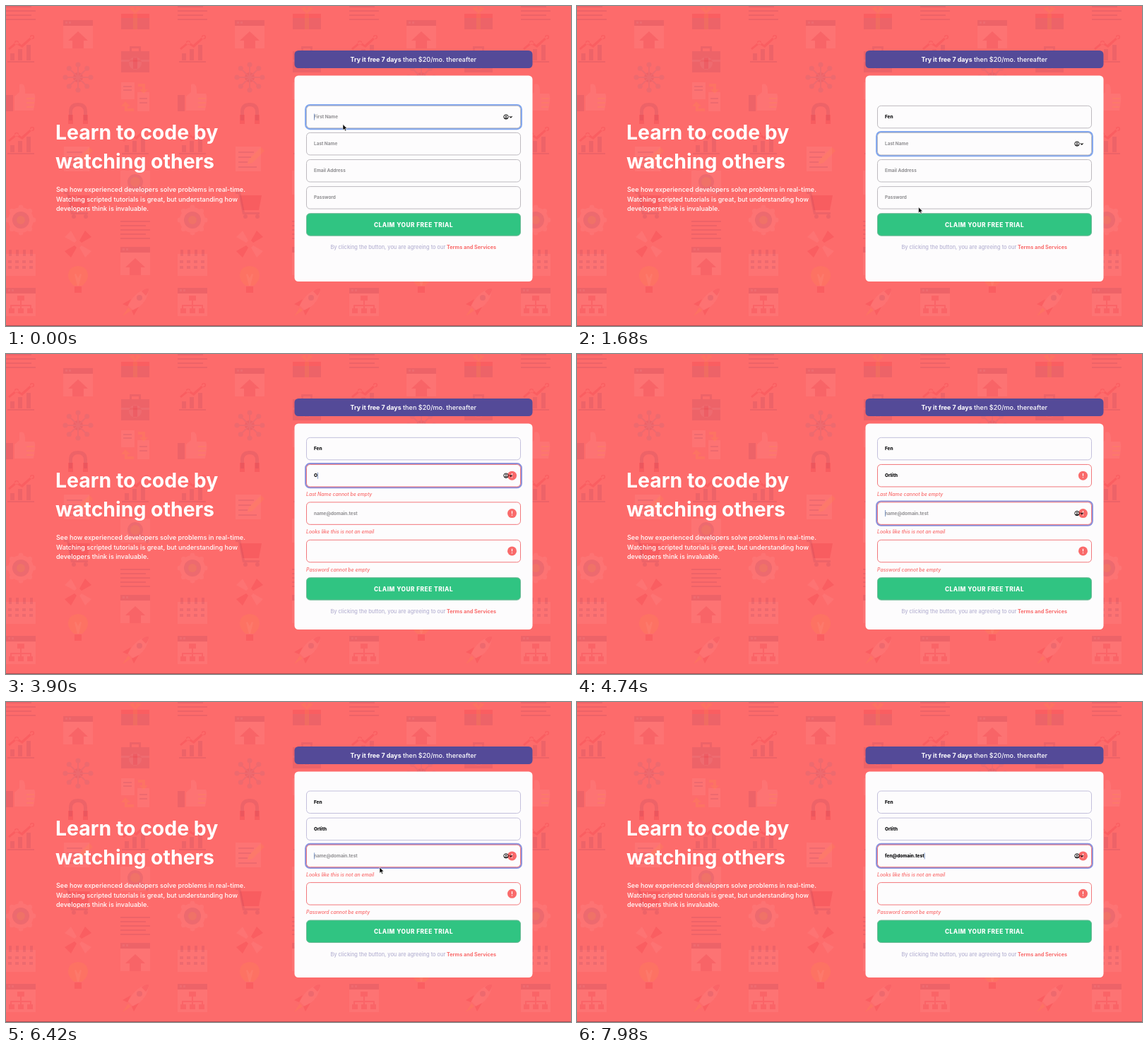
Animation of 800 by 453 pixels, one loop 8 s. Source, as an HTML page:

```html
<!DOCTYPE html>
<html lang="en">
<head>
<meta charset="utf-8">
<title>Sign-up form</title>
<style>
html, body { margin: 0; width: 100%; height: 100%; overflow: hidden; background: #fd6b6b; }
svg { display: block; width: 100vw; height: 100vh; }
text { font-family: Inter, "Open Sans", sans-serif; }
.title { font-size: 28.4px; font-weight: 700; fill: #fff; }
.intro { font-size: 9.1px; font-weight: 500; fill: #fff; }
.offer { font-size: 9.1px; font-weight: 500; fill: #fff; }
.offer-bold { font-size: 8.9px; font-weight: 700; fill: #fff; }
.hint { font-size: 6.45px; font-weight: 700; fill: #8f8e91; }
.value { font-size: 6.45px; font-weight: 800; fill: #0a0a0c; }
.error { font-size: 6.9px; font-weight: 500; font-style: italic; fill: #f96a6a; }
.action { font-size: 8.3px; font-weight: 800; letter-spacing: .5px; fill: #fff; text-anchor: middle; }
.terms { font-size: 7.42px; font-weight: 500; fill: #b6b3d3; }
.terms-bold { font-size: 7.25px; font-weight: 700; fill: #f96a6a; }
</style>
</head>
<body>
<svg id="stage" viewBox="0 0 800 453" preserveAspectRatio="none">
  <rect width="800" height="453" fill="#fd6b6b"/>
  <g id="pattern"></g>
  <rect y="452" width="800" height="1" fill="#a94f55"/>

  <text class="title" x="70" y="189">Learn to code by</text>
  <text class="title" x="70" y="230.3">watching others</text>
  <text class="intro" x="71" y="263">See how experienced developers solve problems in real-time.</text>
  <text class="intro" x="71" y="276.5">Watching scripted tutorials is great, but understanding how</text>
  <text class="intro" x="71" y="290">developers think is invaluable.</text>

  <rect x="408.5" y="63" width="337" height="25" rx="5.5" fill="#544a98"/>
  <text class="offer-bold" x="487.5" y="78.7">Try it free 7 days</text>
  <text class="offer" x="562" y="78.7">then $20/mo. thereafter</text>
  <rect x="408.5" y="98.5" width="337" height="291.5" rx="5.5" fill="#fdfcfd"/>

  <g id="fields"></g>
  <g id="footer">
    <rect x="425.5" y=".5" width="303" height="31.5" rx="5" fill="#30c482" stroke="#6fb896"/>
    <text class="action" x="577" y="19.4">CLAIM YOUR FREE TRIAL</text>
    <text class="terms" x="459.5" y="51">By clicking the button, you are agreeing to our</text>
    <text class="terms-bold" x="624" y="51">Terms and Services</text>
  </g>
  <g id="autofill" fill="none" stroke="#111">
    <circle r="3.2"/>
    <circle cy="-.8" r="1" fill="#111" stroke="none"/>
    <path d="M-2 2.2Q0 0 2 2.2" fill="#111"/>
    <path d="M5-.8l1.8 1.8 1.8-1.8" stroke-width="1.2"/>
  </g>
  <path id="caret" d="M0-4.5v9" stroke="#5f7fb8" stroke-width=".8"/>
  <path id="pointer" d="M0 0v8.3l2-1.8 1.3 2.9 1.4-.6-1.3-2.8h2.6z" fill="#000" stroke="#fff" stroke-width=".6"/>
</svg>
<script>
const LOOP = 8000, STEP = 60;
const byId = id => document.getElementById(id);

function add(parent, tag, attrs = {}, label = '') {
  const el = document.createElementNS('http://www.w3.org/2000/svg', tag);
  for (const key in attrs) el.setAttribute(key, attrs[key]);
  el.textContent = label;
  return parent.appendChild(el);
}
const show = (el, on) => el.setAttribute('visibility', on ? 'visible' : 'hidden');
const move = (el, x, y) => el.setAttribute('transform', `translate(${x} ${y})`);

// Background icons: tint and path, centred on 0,0
const tints = {
  dark: 'rgba(120,45,85,.12)', light: 'rgba(255,205,200,.08)',
  red: 'rgba(230,35,50,.18)', gold: 'rgba(255,155,60,.16)'
};
const disc = (x, y, r) => `M${x - r} ${y}a${r} ${r} 0 1 0 ${2 * r} 0a${r} ${r} 0 1 0 ${-2 * r} 0z`;
const windowFrame = [['dark', 'M-21-20h42v8h-42z'], ['light', 'M-21-12h42v32h-42zM-18-18h3v3h-3zM-13-18h3v3h-3z']];
const spokes = Array.from({ length: 8 }, (_, i) => {
  const c = Math.cos(i * Math.PI / 4), s = Math.sin(i * Math.PI / 4);
  return { ball: disc(18 * c, 18 * s, 3.5), line: `M${-s} ${c}L${16 * c - s} ${16 * s + c}L${16 * c + s} ${16 * s - c}L${s} ${-c}z` };
});
const balls = spokes.map(s => s.ball).join(''), lines = spokes.map(s => s.line).join('');
const icons = {
  upload: [...windowFrame, ['red', 'M0-4L14 9H8V20H-8V9H-14z']],
  sitemap: [...windowFrame, ['red', 'M-5-9H5V-2H1V4H15V9H17V16H9V9H13V6H1V9H4V16H-4V9H-1V6H-13V9H-9V16H-17V9H-15V4H-1V-2H-5z']],
  hub: [['light', balls + lines], ['dark', balls + lines + disc(0, 0, 7)]],
  gear: [['light', balls + disc(0, 0, 18)], ['dark', disc(0, 0, 12)], ['gold', disc(0, 0, 6)]],
  gift: [['dark', 'M-20 2H20V18H-20z'], ['red', 'M-20-4H20V2H-20z'], ['gold', 'M-3-4H3V18H-3zM0-4L-9-12-2-14 0-8 2-14 9-12z']],
  toolbox: [['dark', 'M-20-11H20V19H-20zM-8-18H8V-11H5V-15H-5V-11H-8z'], ['light', 'M-20 1H20V4H-20z' + disc(0, 6, 9)], ['red', 'M-3-2H3V14H-3z']],
  files: [['light', 'M-20-21H-1V3H-20zM3-7H20V20H3z'], ['gold', 'M4-19H14V-11H18L12-5 6-11H10V-15H4zM-14 6L-7 13H-11V16H-2V20H-15V13H-20z'], ['dark', 'M-17-16h12v2h-12zM-17-11h12v2h-12zM6 1h11v2H6zM6 7h11v2H6z']],
  headphones: [['dark', 'M-13 10V-2Q-13-15 0-15Q13-15 13-2V10H8V-2Q8-10 0-10Q-8-10-8-2V10z'], ['red', 'M-14 2h7v13h-7zM7 2h7v13H7z']],
  thumb: [['light', 'M-9-2L-2-8V-19Q5-22 6-12V-6H19Q22-2 18 18H-9z'], ['dark', 'M-21-4h10v23h-10z'], ['gold', 'M8 0h11v2H8zM8 6h11v2H8zM8 12h10v2H8z']],
  chart: [['dark', 'M-19 18H19V20H-19zM-15 7h6V17h-6zM-4 1H2V17h-6zM8-5h6V17H8z'], ['red', 'M-18 0L-6-10 1-5 16-18 18-16 2-1-6-6-16 2z' + disc(-6, -8, 3) + disc(16, -16, 3)]],
  note: [['light', 'M-20-17H16V18H-20z'], ['dark', 'M-16-10H6v2H-16zM-16-3H2v2H-16zM-16 4H-3v2H-16zM-16 11H10v2H-16z'], ['gold', 'M16-16L21-11 4 6-3 8-1 1z']],
  trolley: [['red', 'M-14-13H17L13 8H-10z'], ['dark', 'M-20-18h7l6 29H14v3H-10L-16-15h-4z' + disc(-6, 17, 3) + disc(11, 17, 3)]],
  petals: [['light', 'M-19-10L-10-19-2-5-5-2zM19 10L10 19 2 5 5 2z'], ['red', 'M19-10L10-19 2-5 5-2zM-19 10L-10 19-2 5-5 2z']],
  bulb: [['gold', 'M-6 9Q-14 2-14-6Q-13-18 0-19Q13-18 14-6Q14 2 6 9z'], ['red', 'M-5 10H5V19H-5z'], ['light', 'M-3-8L0-2 3-8 5-7 1 9H-1L-5-7z']],
  lens: [['light', 'M-21-17H21V17H-21z'], ['dark', disc(0, -1, 11) + 'M7 8l3-3 10 10-3 3z'], ['gold', disc(0, -1, 7)]],
  lines: [['dark', [-12, -6, 0, 6, 12].map((y, i) => `M-21 ${y}h${i % 2 ? 36 : 42}v2h${i % 2 ? -36 : -42}z`).join('')]],
  calendar: [['light', 'M-21-12H21V19H-21z'], ['dark', [-15, -5, 5, 15].map(x => `M${x - 2}-18h4v9h-4zM${x - 3}-3h5v4h-5zM${x - 3} 5h5v4h-5z`).join('')]],
  rocket: [['light', 'M19-20Q1-18-10 4L-3 11Q18 1 19-20z'], ['red', 'M-6-5L-18 2-11 5zM5 6L-2 18-5 11zM19-20Q13-20 9-16L15-10Q19-15 19-20z'], ['dark', disc(6, -7, 4)], ['gold', 'M-10 7L-18 19-6 11z']]
};
const columns = [
  { x: 21, items: [['lines', 6], ['chart', 60], ['thumb', 130], ['chart', 190], ['gear', 303], ['calendar', 363], ['sitemap', 419]] },
  { x: 102, items: [['upload', 40], ['hub', 101], ['headphones', 152], ['note', 216], ['trolley', 281], ['petals', 337], ['bulb', 387]] },
  { x: 183, items: [['gift', 15], ['toolbox', 75], ['files', 129], ['chart', 190], ['lens', 250], ['lines', 316], ['upload', 361], ['rocket', 420]] }
];
for (const { x, items } of columns) {
  for (const [name, y] of items) {
    for (let left = x; left < 830; left += 243) {
      const icon = add(byId('pattern'), 'g');
      move(icon, left, y);
      for (const [tint, d] of icons[name]) add(icon, 'path', { d, fill: tints[tint] });
    }
  }
}

// Form
const form = [
  { hint: 'First Name', error: '' },
  { hint: 'Last Name', error: 'Last Name cannot be empty' },
  { hint: 'Email Address', retry: 'name@domain.test', error: 'Looks like this is not an email' },
  { hint: 'Password', error: 'Password cannot be empty' }
];
const GAP = 38.1, ERROR_GAP = 15.3, LEFT = 436;
for (const field of form) {
  const g = field.group = add(byId('fields'), 'g');
  field.ring = add(g, 'rect', { x: 424.3, y: -.7, width: 305.4, height: 33.9, rx: 6, fill: 'none', stroke: '#7fa5ee', 'stroke-width': 2.4 });
  field.box = add(g, 'rect', { x: 425.5, y: .5, width: 303, height: 31.5, rx: 5, fill: '#fdfcfd' });
  field.hintText = add(g, 'text', { class: 'hint', x: LEFT, y: 18.4 });
  field.valueText = add(g, 'text', { class: 'value', x: LEFT, y: 18.4 });
  field.warning = add(g, 'g');
  add(field.warning, 'circle', { cx: 716.5, cy: 16.2, r: 6.5, fill: '#f96a6a' });
  add(field.warning, 'path', { d: 'M716.5 13v3.8M716.5 18.2v1.2', stroke: '#fff', 'stroke-width': 1.2 });
  add(field.warning, 'text', { class: 'error', x: 425, y: 45 }, field.error);
}

// Timeline, in ms
const focusSteps = [[0, 0], [960, 1], [2040, -1], [3300, 1], [4620, 2], [5580, -1], [6240, 2]];
const errorSteps = [[0, []], [2040, [1, 2, 3]], [5580, [2, 3]]];
const typing = [
  { field: 0, start: 360, pace: 120, word: 'Fen' },
  { field: 1, start: 3840, pace: 120, word: 'Orlith' },
  { field: 2, start: 6840, pace: 72, word: 'fen@domain.test' }
];
const pointerPath = [
  [0, 477, 167.5], [1200, 477, 167.5], [1860, 485, 311], [2520, 485, 311], [3180, 500, 180],
  [4860, 500, 180], [5460, 520, 328], [5640, 520, 328], [6180, 529, 234], [LOOP, 529, 234]
];
const pointerShown = [[0, 360], [1200, 3840], [4860, 6840]];

const latest = (steps, t) => steps.filter(s => s[0] <= t).pop();

function pointerAt(t) {
  const i = pointerPath.findIndex(p => p[0] > t);
  const [t0, x0, y0] = pointerPath[i - 1], [t1, x1, y1] = pointerPath[i];
  const k = (t - t0) / (t1 - t0), ease = k * k * (3 - 2 * k);
  return [x0 + (x1 - x0) * ease, y0 + (y1 - y0) * ease];
}

function render(t) {
  const [focusTime, focus] = latest(focusSteps, t);
  const errors = latest(errorSteps, t)[1];
  const submitted = errors.length > 0;
  let lastInput = focusTime;
  let y = 140.8 - errors.length * ERROR_GAP / 2;

  form.forEach((field, i) => {
    const entry = typing.find(e => e.field === i);
    let value = '';
    if (entry && t >= entry.start) {
      const count = Math.min(entry.word.length, Math.floor((t - entry.start) / entry.pace) + 1);
      value = entry.word.slice(0, count);
      if (i === focus) lastInput = Math.max(lastInput, entry.start + (count - 1) * entry.pace);
    }
    const wrong = errors.includes(i);
    move(field.group, 0, y);
    field.valueText.textContent = value;
    field.hintText.textContent = value ? '' : submitted ? field.retry || '' : field.hint;
    field.box.setAttribute('stroke', wrong ? '#f2777b' : submitted ? '#c3c0dc' : '#bdbabf');
    field.ring.setAttribute('stroke', wrong ? '#8a91dc' : '#7fa5ee');
    show(field.ring, i === focus);
    show(field.warning, wrong);
    if (i === focus) {
      move(byId('autofill'), 708, y + 16.2);
      move(byId('caret'), LEFT + .5 + (value ? field.valueText.getComputedTextLength() : 0), y + 16.2);
    }
    y += GAP + (wrong ? ERROR_GAP : 0);
  });

  move(byId('footer'), 0, y);
  show(byId('autofill'), focus >= 0);
  show(byId('caret'), focus >= 0 && (t - lastInput) % 1000 < 500);
  show(byId('pointer'), pointerShown.some(([from, to]) => t >= from && t < to));
  move(byId('pointer'), ...pointerAt(t));
}

const begin = performance.now();
function tick() {
  const t = (performance.now() - begin) % LOOP;
  render(Math.floor(t / STEP) * STEP);
  requestAnimationFrame(tick);
}
tick();
</script>
</body>
</html>
```
